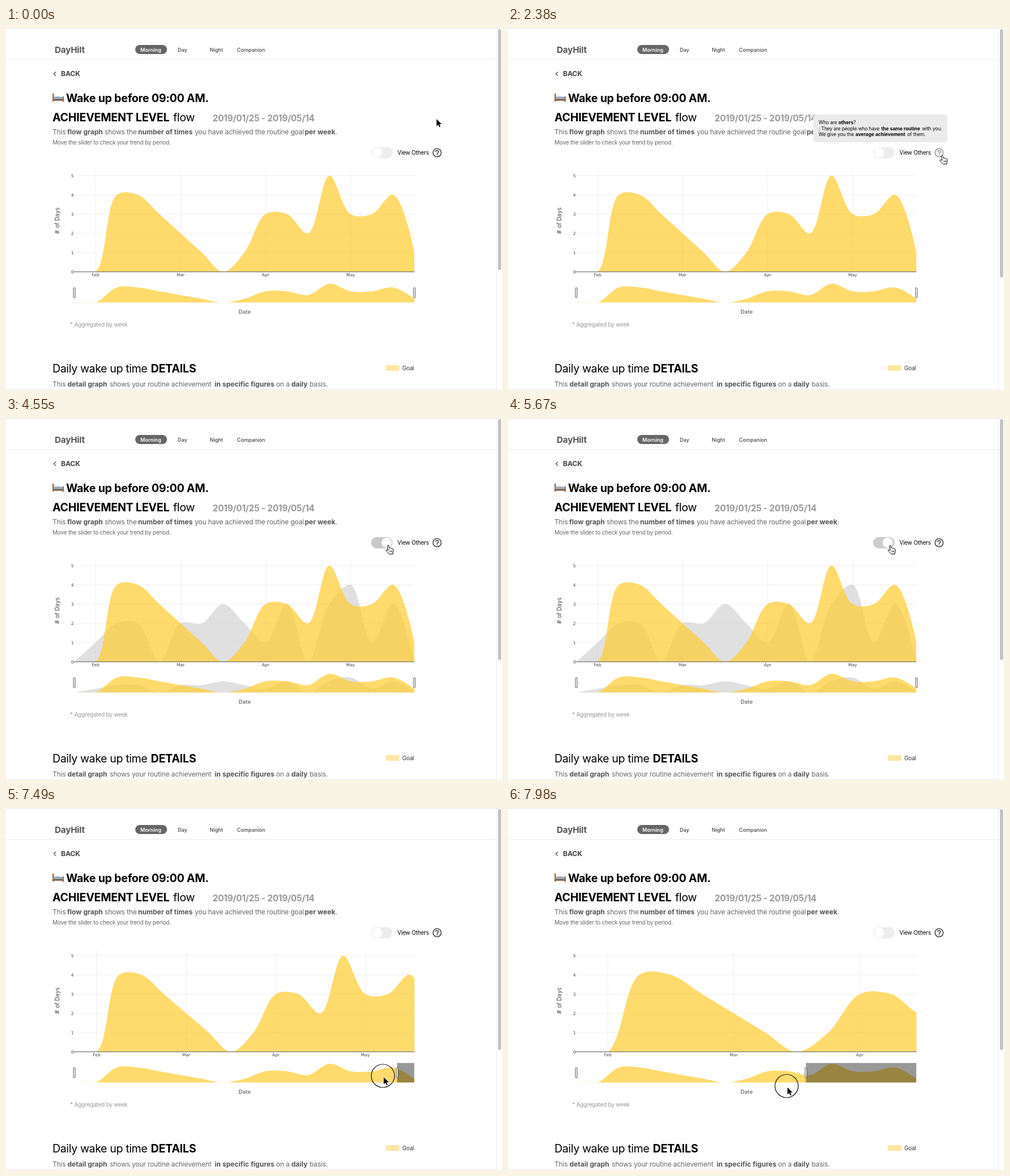
Animation of 875x640 px, one loop 8000 ms. Source, as an HTML page:

```html
<!DOCTYPE html>
<html lang="en">
<head>
<meta charset="utf-8">
<title>Routine flow</title>
<style>
html, body { margin: 0; width: 100%; height: 100%; overflow: hidden; background: #fff; }
svg { display: block; font-family: Inter, sans-serif; font-optical-sizing: none; }
text { white-space: pre; letter-spacing: -.02em; }
.b { font-weight: 700; letter-spacing: -.012em; }
.title { font-size: 19.6px; }
.desc { font-size: 12px; fill: #666; letter-spacing: -.013em; }
.desc .b { letter-spacing: .002em; fill: #555; }
.small { font-size: 10px; }
.nav { font-size: 9.1px; font-weight: 500; fill: #444; }
.nav text { letter-spacing: 0; }
.nav .b { font-weight: 600; fill: #fff; }
.tip { font-size: 8.4px; letter-spacing: -.01em; }
.tip .b { letter-spacing: 0; }
.plot text { font-family: "DejaVu Sans", sans-serif; font-size: 7.5px; fill: #444; letter-spacing: 0; }
.plot .axis { font-size: 9px; }
.grid { stroke: #eee; }
.goal { fill: rgba(255, 204, 48, .7); }
.others { fill: rgba(211, 211, 211, .7); }
.handle { fill: #fff; stroke: #444; stroke-width: .9; }
.line { fill: none; stroke: #d0d0d0; stroke-width: 1.5; }
.pointer { stroke-linejoin: round; }
.solid { stroke: #fff; stroke-width: 1.6; paint-order: stroke; }
</style>
</head>
<body>
<svg width="875" height="640" viewBox="0 0 875 640">
  <defs>
    <clipPath id="plotClip"><rect x="120.5" y="252" width="600" height="179"/></clipPath>
    <clipPath id="miniClip"><rect x="120.5" y="450.5" width="600" height="35"/></clipPath>
  </defs>

  <path d="M0 .5H875" stroke="#e2e2e2"/>
  <path d="M0 55.5H865M0 638.5H865M865.5 1V640" stroke="#ebebeb"/>
  <rect id="thumb" x="868" y="2" width="5.5" height="426" rx="2.75" fill="#c1c1c1"/>

  <text x="86" y="44" class="b" font-size="15.2" fill="#555">DayHilt</text>
  <rect x="228" y="30" width="56" height="16" rx="8" fill="#666"/>
  <g class="nav">
    <text x="237" y="42" class="b">Morning</text>
    <text x="303" y="42">Day</text>
    <text x="359.5" y="42">Night</text>
    <text x="407.5" y="42">Companion</text>
  </g>
  <path d="M88 77.5l-3.5 3.5 3.5 3.5" fill="none" stroke="#444" stroke-width="1.2"/>
  <text x="97" y="85" class="b" font-size="12.2" fill="#444">BACK</text>

  <g id="bed">
    <path d="M82 116h2.5v14H82zM99.5 121h2.5v9.5h-2.5z" fill="#9a6a48"/>
    <path d="M84 126h16v2.5H84z" fill="#7b5238"/>
    <path d="M84.5 122l3-1.5 12 1.5v4h-15z" fill="#8fa9c0"/>
    <path d="M84.5 119.5h4.5l1.5 2.5h-6z" fill="#d8dde2"/>
  </g>
  <text x="106" y="130.5" class="title b">Wake up before 09:00 AM.</text>
  <text x="82" y="164.5" class="title"><tspan class="b">ACHIEVEMENT LEVEL</tspan><tspan x="295">flow</tspan></text>
  <text x="364.5" y="164.8" class="b" font-size="15.3" fill="#999">2019/01/25 - 2019/05/14</text>
  <text y="188" class="desc"><tspan x="82">This</tspan><tspan x="108" class="b">flow graph</tspan><tspan x="174">shows the</tspan><tspan x="233" class="b">number of times</tspan><tspan x="333">you have achieved the routine goal</tspan><tspan x="527" class="b">per week</tspan><tspan x="581">.</tspan></text>
  <text x="82" y="205.5" class="small" fill="#666">Move the slider to check your trend by period.</text>

  <rect id="track" x="644" y="210.5" width="38" height="20" rx="10"/>
  <circle id="knob" cy="220.5" r="9" fill="#fff"/>
  <text x="690.5" y="224" class="small">View Others</text>
  <g id="help" fill="none" stroke="#444" stroke-width="1.6">
    <circle cx="760.5" cy="220.5" r="7.2"/>
    <path d="M758.1 218.900a2.4 2.4 0 0 1 4.8 0c0 1.8-2.4 1.9-2.4 4M760.5 223.700v1.600"/>
  </g>

  <g class="plot">
    <g id="rows"></g>
    <g id="months"></g>
    <g clip-path="url(#plotClip)">
      <path id="mainOthers" class="others"/>
      <path id="mainGoal" class="goal"/>
    </g>
    <path d="M119 431H720.5" stroke="#5a5a5a"/>
    <g clip-path="url(#miniClip)">
      <path id="miniOthers" class="others"/>
      <path id="miniGoal" class="goal"/>
      <rect id="mask" y="450.5" height="35" fill="rgba(0,0,0,.4)"/>
    </g>
    <rect x="119" y="459.3" width="3" height="17.5" rx=".8" class="handle"/>
    <rect id="handle" y="459.3" width="3" height="17.5" rx=".8" class="handle"/>
    <text x="421" y="505" class="axis" text-anchor="middle">Date</text>
    <text transform="translate(94 341) rotate(-90)" class="axis" style="font-size:9.6px" text-anchor="middle"># of Days</text>
  </g>
  <text x="113" y="528" class="small" fill="#999">* Aggregated by week</text>

  <g id="modebar">
    <path d="M636.5 237.5h2.5l1-1.5h3l1 1.5h2.5v7h-10z" fill="#d0d0d0"/>
    <circle cx="641.5" cy="240.8" r="1.8" fill="#fff"/>
    <circle cx="660.5" cy="239.8" r="3.3" class="line" style="stroke:#777"/>
    <path d="M663 242.3l3 3M659 239.8h3M660.5 238.3v3" class="line" style="stroke:#777"/>
    <path d="M672 240.5h10M677 235.5v10M723 236.5l8 8M731 236.5l-8 8" class="line"/>
    <path d="M692.5 236h9v9h-9zM707.5 236h9v9h-9zM737 241l5-5 5 5h-1.5v4h-7v-4z" fill="#d0d0d0"/>
    <path d="M694.5 240.5h5M697 238v5M709.5 240.5h5" stroke="#fff" stroke-width="1.3"/>
    <rect x="757.5" y="236" width="10" height="9.5" fill="#444"/>
  </g>

  <text y="609" class="title"><tspan x="82">Daily wake up time</tspan><tspan x="255.5" class="b">DETAILS</tspan></text>
  <rect x="670" y="596" width="24" height="10" fill="#ffe7a3"/>
  <text x="699" y="604.5" class="small" fill="#333">Goal</text>
  <text y="633.5" class="desc"><tspan x="82">This</tspan><tspan x="108.5" class="b">detail graph</tspan><tspan x="183">shows your routine achievement</tspan><tspan x="368" class="b">in specific figures</tspan><tspan x="476.5">on a</tspan><tspan x="503.5" class="b">daily</tspan><tspan x="535.5">basis.</tspan></text>

  <g id="tooltip">
    <rect x="538.5" y="153" width="236.5" height="49" rx="5" fill="#ebebeb"/>
    <text x="548" y="170" class="tip">Who are <tspan class="b">others</tspan>?</text>
    <text x="548" y="180.5" class="tip">: They are people who have <tspan x="658.5" class="b">the same routine</tspan><tspan x="730.5">with you.</tspan></text>
    <text x="548" y="191" class="tip">We give you the <tspan x="613" class="b">average achievement</tspan><tspan x="704.5">of them.</tspan></text>
  </g>

  <circle id="ring" fill="none" stroke="#111" stroke-width="1.2"/>
  <g id="pointer" class="pointer">
    <path id="arrow" class="solid" d="M0 0V12.5L3 9.8L5 14.3L7 13.4L5 9H9Z"/>
    <g id="hand" fill="#fff" stroke="#000">
      <path d="M-1.3 1.200Q-.2-1 1.200.8L2.400 5Q3.800 4 4.700 5.400Q6.300 4.400 7.200 6Q9 5.600 9.300 7.500Q10 11 8.500 13V15.500H1.800Q-.5 13-3.700 9.500Q-3.600 7.300-1 8.400L.4 9Z"/>
      <path d="M3.200 9.500l.3 3M5.200 9.300l.2 3M7 9.200v3" stroke-width=".8"/>
    </g>
    <path id="resize" class="solid" d="M-7 0l4.500-4.500v3h1.500v-2.500h2v2.500h1.500v-3L7 0l-4.500 4.500v-3H1v2.500h-2v-2.500h-1.500v3z"/>
  </g>
</svg>
<script>
const LOOP = 8000, STEP = 70;
const LEFT = 120.5, WIDTH = 600, RIGHT = LEFT + WIDTH;
const goal = [0, 0, 4, 4, 3, 2, 1, 0, 1, 3, 3, 2, 5, 3, 3, 4, 1];
const others = [0, 1, 2, 2, 0, 2, 2, 3, 2, 1, 3, 0, 3, 4, 1, 3, 0];
const WEEK = WIDTH / (goal.length - 1);

const el = id => document.getElementById(id);
const set = (id, attrs) => {
  for (const name in attrs) el(id).setAttribute(name, attrs[name]);
};
const show = (id, on) => { el(id).style.display = on ? '' : 'none'; };
const ease = p => p * p * (3 - 2 * p);
const linear = p => p;

// Each key is [time, value, easing towards this key].
function track(keys, t) {
  if (t <= keys[0][0]) return keys[0][1];
  for (let i = 1; i < keys.length; i++) {
    const [t0, v0] = keys[i - 1], [t1, v1, curve = linear] = keys[i];
    if (t <= t1) return v0 + (v1 - v0) * curve((t - t0) / (t1 - t0));
  }
  return keys[keys.length - 1][1];
}

// Bézier handles on both sides of a point, centripetal Catmull-Rom.
function tangents(prev, point, next) {
  const d1 = [prev[0] - point[0], prev[1] - point[1]];
  const d2 = [next[0] - point[0], next[1] - point[1]];
  const a1 = Math.sqrt(Math.hypot(...d1)), a2 = Math.sqrt(Math.hypot(...d2));
  const num = [0, 1].map(i => a2 * a2 * d1[i] - a1 * a1 * d2[i]);
  const side = k => point.map((v, i) => v + num[i] / (k * 3 * (a1 + a2)));
  return [side(a2), side(-a1)];
}

function area(values, week, base, unit) {
  const pts = values.map((v, i) => [LEFT + i * week, base - v * unit]);
  const last = pts.length - 1;
  const tan = pts.map((p, i) => i && i < last ? tangents(pts[i - 1], p, pts[i + 1]) : null);
  let d = `M${pts[0]}Q${tan[1][0]} ${pts[1]}`;
  for (let i = 2; i < last; i++) d += `C${tan[i - 1][1]} ${tan[i][0]} ${pts[i]}`;
  return d + `Q${tan[last - 1][1]} ${pts[last]}V${base}H${LEFT}Z`;
}

el('rows').innerHTML = goal.slice(0, 6).map((_, n) => {
  const y = 431 - 34 * n;
  return `<path class="grid" d="M${LEFT} ${y}H${RIGHT}"/>
    <text x="119.5" y="${y + 2.8}" text-anchor="end">${n}</text>`;
}).join('');
set('miniGoal', { d: area(goal, WEEK, 485.5, 6.67) });
set('miniOthers', { d: area(others, WEEK, 485.5, 6.67) });

let drawnEdge;
function drawPlot(edge) {
  if (edge === drawnEdge) return;
  drawnEdge = edge;
  const week = WEEK * WIDTH / (edge - LEFT);
  set('mainGoal', { d: area(goal, week, 431, 34) });
  set('mainOthers', { d: area(others, week, 431, 34) });
  el('months').innerHTML = ['Feb', 'Mar', 'Apr', 'May'].map((name, i) => {
    const x = LEFT + week * (1 + 4 * i);
    return x > RIGHT ? '' : `<path class="grid" d="M${x} 252V431"/>
      <text x="${x}" y="439" text-anchor="middle">${name}</text>`;
  }).join('');
  set('mask', { x: edge, width: RIGHT - edge });
  set('handle', { x: edge - 1.5 });
}

const pointerX = [[700, 759.5], [1540, 765.5, ease], [2800, 765.5], [3360, 674, ease],
  [6370, 674], [6650, 684], [7210, 721, ease], [7280, 721], [7420, 690], [7700, 595.5], [7980, 493]];
const pointerY = [[700, 161], [1540, 225, ease], [6370, 225], [6650, 316],
  [7210, 468, ease], [7280, 468], [7700, 484], [7980, 494]];
const edgeX = [[7280, RIGHT], [7490, 690, p => p * p], [7700, 633.7], [7980, 525.5]];
const toggle = [[4060, 0], [4410, 1, ease], [5600, 1], [5950, 0, ease]];

function draw(t) {
  const x = track(pointerX, t), y = track(pointerY, t);
  const dragging = t >= 7350;
  const onHelp = Math.hypot(x - 760.5, y - 220.5) < 9.5;
  const onToggle = x < 682 && y < 231;
  const onPlot = y > 252 && y < 431 || y > 458;

  const kind = onHelp || onToggle ? 'hand' : onPlot && !dragging ? 'resize' : 'arrow';
  for (const id of ['arrow', 'hand', 'resize']) show(id, id === kind);
  set('pointer', { transform: `translate(${x} ${y})` });

  const clicking = t >= 3850 && t < 4060 || t >= 5460 && t < 5670;
  show('ring', clicking || t >= 7210);
  set('ring', { cx: x - 1.5, cy: y - 2.5, r: dragging ? 20.5 : 29.3 });

  show('tooltip', onHelp);
  set('help', { opacity: onHelp ? .55 : 1 });
  set('thumb', { height: onHelp ? 439 : 426 });
  show('modebar', y > 231 && !dragging);

  const on = track(toggle, t), shade = 237 - 37 * on;
  set('track', { fill: `rgb(${shade},${shade},${shade})` });
  set('knob', { cx: 654.5 + 17 * on });
  const compare = t >= 4130 && t < 5740;
  show('mainOthers', compare);
  show('miniOthers', compare);

  drawPlot(track(edgeX, t));
}

const start = performance.now();
function tick() {
  const t = (performance.now() - start) % LOOP;
  draw(Math.floor(t / STEP) * STEP);
  requestAnimationFrame(tick);
}
tick();
</script>
</body>
</html>
```
